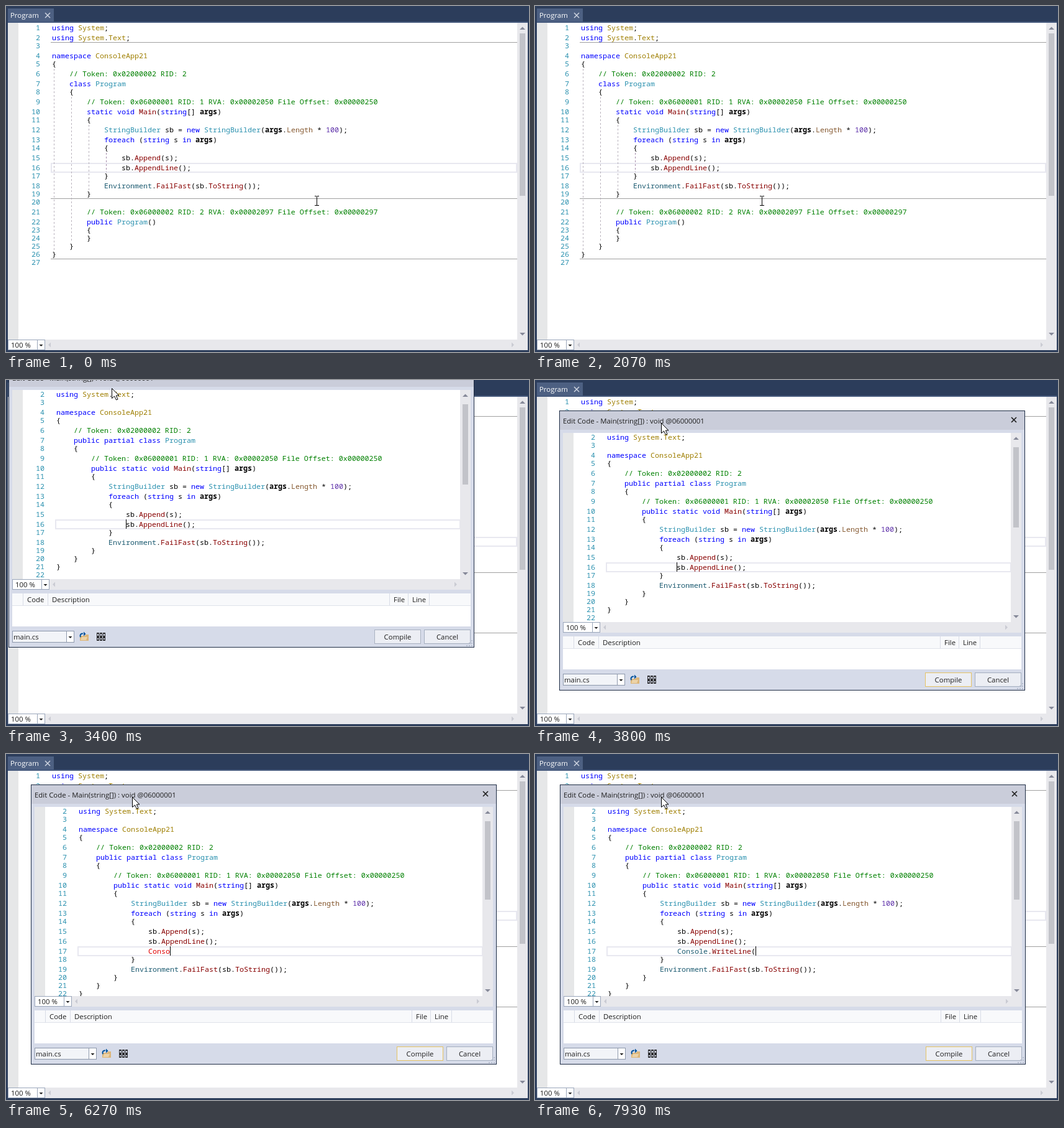
An HTML page with a canvas for the animation above (8 s loop, 842 by 556 pixels).

```html
<!DOCTYPE html>
<html lang="en">
<head>
<meta charset="utf-8">
<title>Code editor</title>
<style>
html, body { margin: 0; width: 100%; height: 100%; overflow: hidden; background: #2c3d5b; }
canvas { display: block; width: 842px; height: 556px; }
</style>
</head>
<body>
<canvas id="stage" width="842" height="556"></canvas>
<script>
const ctx = document.getElementById('stage').getContext('2d');
const LOOP = 8000, TICK = 1000 / 15, COL = 7;
const MONO = '11.667px "Noto Sans Mono", "DejaVu Sans Mono", monospace';
const UI = '11.4px "Open Sans", "Noto Sans", sans-serif';

const INK = {
  keyword: '#0000ff', comment: '#008000', number: '#5b2da8', error: '#e00000',
  plain: '#000000', space: '#9e7e00', type: '#2b91af', fixed: '#1b5a70',
  method: '#880000', prop: '#85582f', lineNo: '#2b91af'
};
const KIND = {};
const define = (kind, words) => words.split(' ').forEach(w => KIND[w] = kind);
define('keyword', 'using namespace class static void string new foreach in public partial');
define('space', 'System Text ConsoleApp21');
define('type', 'Program StringBuilder');
define('fixed', 'Environment Console');
define('method', 'Main Append AppendLine FailFast ToString WriteLine');
define('prop', 'Length');
define('plain', 'sb s args');

const body = prefix => `using System;
using System.Text;

namespace ConsoleApp21
{
    // Token: 0x02000002 RID: 2
    ${prefix ? 'public partial ' : ''}class Program
    {
        // Token: 0x06000001 RID: 1 RVA: 0x00002050 File Offset: 0x00000250
        ${prefix}static void Main(string[] args)
        {
            StringBuilder sb = new StringBuilder(args.Length * 100);
            foreach (string s in args)
            {
                sb.Append(s);
                sb.AppendLine();
            }
            Environment.FailFast(sb.ToString());
        }
`;
const mainLines = (body('') + `
        // Token: 0x06000002 RID: 2 RVA: 0x00002097 File Offset: 0x00000297
        public Program()
        {
        }
    }
}
`).split('\n');
const editLines = (body('public ') + '    }\n}\n').split('\n');

// All times below are in ticks of 1/15 s.
const POINTER = [
  [0, 500, 313], [9, 342, 252], [20, 342, 252], [25, 363, 311], [28, 363, 311],
  [29, 365, 313], [31, 365, 313], [40, 167, 12], [42, 167, 12], [43, 163, -28],
  [49, 163, -28], [50, 166, -9], [51, 170, 13], [52, 176, 32], [54, 192, 58], [57, 203, 69]
];
const DIALOG = [
  [49, -42, -97], [50, -40, -86], [51, -36, -69], [52, -31, -48], [54, -14, -15],
  [57, -1, 0], [58, 0, 0]
];
const TYPED = 'Console.WriteLine(';
const KEYS = [76, 78, 80, 81, 83, 95, 96, 98, 103, 104, 105, 105, 106, 106, 111, 113, 117, 119];
const OPEN = 34, ENTER = 68, DRAG = 50;

function along(path, t) {
  if (t <= path[0][0]) return path[0].slice(1);
  for (let i = 1; i < path.length; i++) {
    const [t1, x1, y1] = path[i];
    if (t > t1) continue;
    const [t0, x0, y0] = path[i - 1];
    let k = (t - t0) / (t1 - t0);
    if (t1 - t0 > 4) k = k * k * (3 - 2 * k);
    return [Math.round(x0 + (x1 - x0) * k), Math.round(y0 + (y1 - y0) * k)];
  }
  return path[path.length - 1].slice(1);
}

function rect(x, y, w, h, fill) {
  ctx.fillStyle = fill;
  ctx.fillRect(x, y, w, h);
}

function frame(x, y, w, h, edge, fill) {
  rect(x, y, w, h, edge);
  rect(x + 1, y + 1, w - 2, h - 2, fill);
}

function shape(points, fill, edge) {
  ctx.beginPath();
  points.forEach(([x, y]) => ctx.lineTo(x, y));
  ctx.closePath();
  ctx.fillStyle = fill;
  ctx.fill();
  if (edge) {
    ctx.strokeStyle = edge;
    ctx.lineWidth = 1;
    ctx.stroke();
  }
}

function text(s, x, y, fill = '#1e1e1e', font = UI, align = 'left') {
  ctx.font = font;
  ctx.textAlign = align;
  ctx.fillStyle = fill;
  ctx.fillText(s, x, y);
}

function cross(x, y, r, color, width) {
  ctx.strokeStyle = color;
  ctx.lineWidth = width;
  ctx.beginPath();
  ctx.moveTo(x - r, y - r); ctx.lineTo(x + r, y + r);
  ctx.moveTo(x + r, y - r); ctx.lineTo(x - r, y + r);
  ctx.stroke();
}

// Triangle pointing along (dx, dy), half-width r
function arrow(x, y, dx, dy, r, fill) {
  shape([[x + dx * r, y + dy * r], [x - dy * r, y + dx * r], [x + dy * r, y - dx * r]], fill);
}

function codeLine(line, x, y) {
  const parts = line.match(/\/\/.*|\s+|\w+|[^\w\s]+/g) || [];
  let col = 0;
  for (const p of parts) {
    let kind = 'plain';
    if (p.startsWith('//')) kind = 'comment';
    else if (/^\d/.test(p)) kind = 'number';
    else if (/^\w/.test(p)) kind = KIND[p] || 'error';
    if (p.trim()) text(p, x + col * COL, y, INK[kind], (p === 'args' ? 'bold ' : '') + MONO);
    col += p.length;
  }
}

// Lines holding only a brace, or nothing, are shorter.
function layout(lines, y) {
  return lines.map((line, i) => i ? y += /\w/.test(line) ? 16 : 13 : y);
}

function code(lines, rows, x, numX) {
  lines.forEach((line, i) => {
    text(i + 1, numX, rows[i] + 4, INK.lineNo, MONO, 'right');
    codeLine(line, x, rows[i] + 4);
  });
}

function currentLine(x, y, w, h) {
  ctx.strokeStyle = '#e8e8f0';
  ctx.lineWidth = 2;
  ctx.strokeRect(x + 1, y + 1, w - 2, h - 2);
}

function bars(x, y, right, bottom, thumbY, thumbEnd) {
  rect(right, y, 17, bottom - y, '#e8e8ec');
  rect(right + 4, thumbY, 9, thumbEnd - thumbY, '#c2c3c9');
  arrow(right + 8.5, y + 11, 0, -1, 4.5, '#868999');
  arrow(right + 8.5, bottom - 11, 0, 1, 4.5, '#868999');
  rect(x, bottom, right + 17 - x, 17, '#e8e8ec');
  arrow(x + 69, bottom + 8.5, -1, 0, 4, '#cacbd3');
  arrow(right - 9, bottom + 8.5, 1, 0, 4, '#cacbd3');
  frame(x, bottom, 60, 17, '#9aa6ba', '#ffffff');
  frame(x + 47, bottom, 13, 17, '#9aa6ba', '#ffffff');
  arrow(x + 53.5, bottom + 8, 0, 1, 3, '#1e1e1e');
  text('100 %', x + 5, bottom + 13);
}

function guide(x, top, bottom, color) {
  ctx.strokeStyle = color;
  ctx.lineWidth = 1;
  ctx.setLineDash([3, 3]);
  ctx.beginPath();
  ctx.moveTo(x + .5, top);
  ctx.lineTo(x + .5, bottom);
  ctx.stroke();
  ctx.setLineDash([]);
}

function mainWindow() {
  rect(0, 0, 842, 556, '#2c3d5b');
  rect(3, 4, 74, 22, '#4d6082');
  rect(3, 25, 837, 2, '#465a7d');
  text('Program', 7, 19, '#ffffff');
  cross(67, 15, 4, '#ced4e0', 1.5);
  rect(3, 27, 17, 509, '#e6e7e8');
  rect(20, 27, 803, 509, '#ffffff');
  bars(3, 27, 823, 536, 44, 305);
  const rows = layout(mainLines, 35);
  currentLine(72, 252, 751, 16);
  [58, 309, 406].forEach(y => rect(72, y, 751, 1, '#a0a0a0'));
  guide(77, 101, 393, '#b9b3bd');
  guide(105, 146, 380, '#b9b3bd');
  guide(133, 191, 296, '#b9b3bd');
  guide(161, 236, 267, '#a48bab');
  code(mainLines, rows, 74, 55);
}

function button(label, x, edge) {
  frame(x, 470, 75, 23, edge, '#eceef4');
  text(label, x + 37.5, 486, '#1e1e1e', UI, 'center');
}

function toolbar(t) {
  frame(46, 472, 100, 19, '#8e99ac', '#f2f4f8');
  frame(133, 472, 13, 19, '#8e99ac', '#ffffff');
  arrow(139.5, 481, 0, 1, 3, '#1e1e1e');
  text('main.cs', 48, 486);

  // Open folder with a curved arrow
  shape([[155, 480], [163, 480], [164, 478], [169, 478], [169, 488], [155, 488]], '#dcb67a');
  shape([[158, 482], [167, 482], [165, 487], [156, 487]], '#ecd3a8');
  ctx.strokeStyle = '#00539c';
  ctx.lineWidth = 2;
  ctx.beginPath();
  ctx.arc(159, 480, 3.5, Math.PI * .8, Math.PI * 1.6);
  ctx.stroke();
  arrow(161, 477, 1, 0, 3.5, '#00539c');

  // Row of books
  for (let x = 182; x < 196; x += 5) {
    rect(x, 475, 4, 13, '#2d2d30');
    rect(x + 1, 477, 2, 3, '#d6dbe9');
    rect(x + 1, 484, 2, 2, '#d6dbe9');
  }
  button('Compile', 629, t < 54 ? '#aab2c2' : '#e5c365');
  button('Cancel', 709, '#a5afbf');
  for (let i = 0; i < 3; i++)
    for (let j = 0; j <= i; j++) rect(785 - j * 4, 487 + i * 4, 2, 2, '#b3bbcc');
}

function errorList() {
  rect(46, 412, 738, 53, '#ffffff');
  rect(46, 412, 738, 19, '#f8f9fb');
  rect(46, 431, 738, 1, '#dfe2ea');
  [63, 103, 653, 683, 717].forEach(x => rect(x, 412, 1, 19, '#d8dce6'));
  [['Code', 70], ['Description', 110], ['File', 660], ['Line', 690]]
    .forEach(([s, x]) => text(s, x, 426));
}

function dialog(t) {
  const [dx, dy] = along(DIALOG, t);
  ctx.save();
  ctx.translate(dx, dy);
  frame(40, 49, 750, 450, '#1f2d45', '#d6dbe9');
  rect(41, 50, 748, 30, '#cacdda');
  text('Edit Code - Main(string[]) : void @06000001', 46, 70);
  cross(772, 64, 4, '#1e1e1e', 1.7);
  rect(46, 85, 17, 304, '#e6e7e8');
  rect(63, 85, 704, 304, '#ffffff');

  const lines = editLines.slice();
  const count = KEYS.filter(k => k <= t).length;
  const indent = ' '.repeat(16);
  let row = 15;
  if (t >= ENTER) lines.splice(++row, 0, indent + TYPED.slice(0, count));
  const rows = layout(lines, 76);
  const tall = row === 15 || count > 0;
  const top = rows[row] - (tall ? 8 : 5);

  ctx.save();
  ctx.beginPath();
  ctx.rect(46, 85, 721, 304);
  ctx.clip();
  currentLine(115, top, 653, tall ? 16 : 13);
  code(lines, rows, 117, 98);
  const blink = (t >= 43 && t < 47) || (t >= 61 && t < 65);
  if (!blink) rect(117 + (16 + count) * COL, top, 1, tall ? 15 : 13, '#000000');
  ctx.restore();

  bars(46, 85, 767, 389, 108, t < ENTER ? 237 : 234);
  errorList();
  toolbar(t);
  ctx.restore();
}

function pointer(t) {
  const [x, y] = along(POINTER, t);
  if (t < DRAG) {
    rect(x, y - 7, 1, 15, '#000000');
    [-8, 7].forEach(d => {
      rect(x - 3, y + d, 3, 1, '#000000');
      rect(x + 1, y + d, 3, 1, '#000000');
    });
    return;
  }
  const outline = [[0, 0], [0, 16], [4, 12.5], [7, 18.5], [9.5, 17.5], [6.8, 11.5], [11.5, 11.5]];
  shape(outline.map(([a, b]) => [x + a + .5, y + b + .5]), '#ffffff', '#000000');
}

function draw(now) {
  const t = Math.floor(((now % LOOP) + 4) / TICK) % 120;
  mainWindow();
  if (t >= OPEN) dialog(t);
  pointer(t);
}

const start = performance.now();
function loop() {
  draw(performance.now() - start);
  requestAnimationFrame(loop);
}
loop();
</script>
</body>
</html>
```
